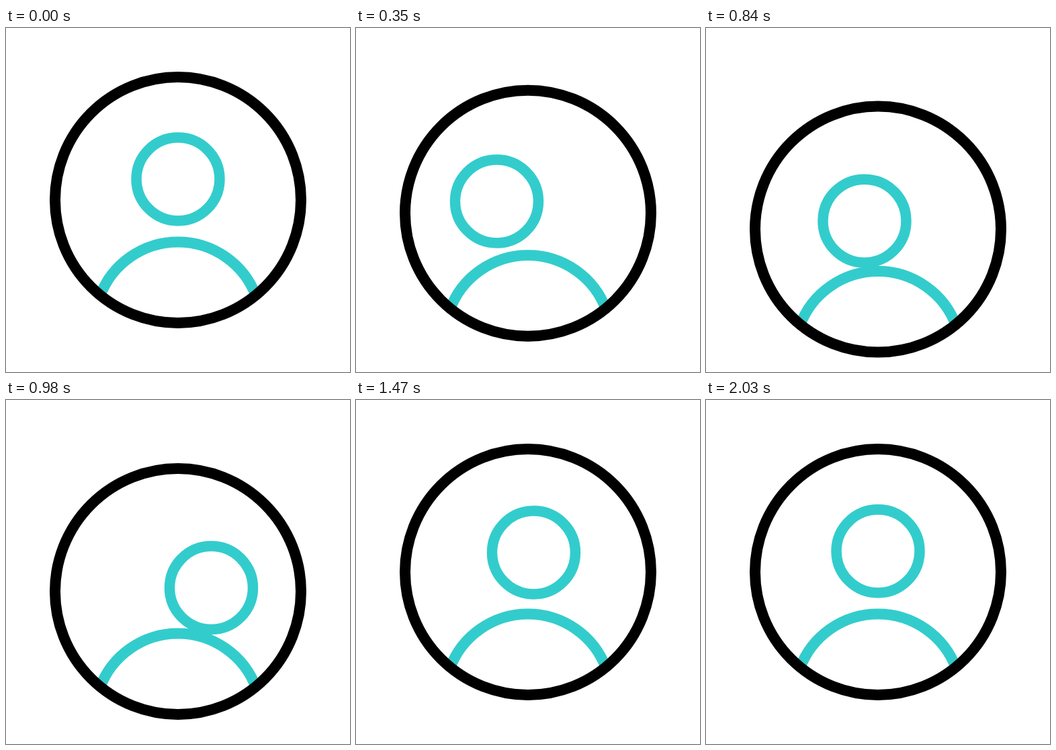
An HTML page for the animation above (2100 ms loop, 512 by 512 pixels).

```html
<!DOCTYPE html>
<html lang="en">
<head>
<meta charset="utf-8">
<title>Profile icon</title>
<style>
  html, body { margin: 0; width: 100%; height: 100%; overflow: hidden; background: #fff; }
  svg { display: block; width: 100vw; height: 100vh; }
</style>
</head>
<body>
<svg viewBox="0 0 512 512" fill="none" stroke="#33cccc" stroke-width="16">
  <g id="badge">
    <path d="M139.5 400A124 124 0 0 1 372.5 400"/>
    <circle cx="256" cy="256" r="183" stroke="#000"/>
  </g>
  <circle id="head" cx="256" cy="225" r="62" stroke-width="15.5"/>
</svg>
<script>
const STEP = 70, STEPS = 30;

// Smooth curve through [step, value] points, flat at turning points.
function curve(points) {
  const slope = i => (points[i + 1][1] - points[i][1]) / (points[i + 1][0] - points[i][0]);
  const tangents = points.map((_, i) => {
    if (i === 0 || i === points.length - 1) return 0;
    const a = slope(i - 1), b = slope(i);
    return a * b > 0 ? 2 * a * b / (a + b) : 0;
  });
  return t => {
    let i = 0;
    while (i < points.length - 2 && t > points[i + 1][0]) i++;
    const [t0, v0] = points[i], [t1, v1] = points[i + 1];
    const d = t1 - t0, u = (t - t0) / d, w = 1 - u;
    return v0 * w * w * (1 + 2 * u) + v1 * u * u * (3 - 2 * u)
      + d * u * w * (tangents[i] * w - tangents[i + 1] * u);
  };
}

const badgeY = curve([[0, 0], [5, 19.7], [8, 38.5], [9, 44], [10, 45], [11.4, 45],
  [14, 29], [16, 11.7], [17, 8.8], [20.8, 0], [STEPS, 0]]);
const headX = curve([[0, 0], [5, -46.5], [9, -79], [9.8, -80], [14, 49.5],
  [15.6, 68.5], [17, 68], [21, 8.5], [23, 0], [STEPS, 0]]);
const headY = curve([[0, 0], [5, 33], [9, 73], [9.8, 74.5], [12.4, 60],
  [14, 54.5], [17, 26], [21, 2], [23, 0], [STEPS, 0]]);

const badge = document.getElementById("badge");
const head = document.getElementById("head");

function draw() {
  const t = Math.floor(performance.now() / STEP + 0.05) % STEPS;
  badge.setAttribute("transform", `translate(0 ${badgeY(t)})`);
  head.setAttribute("transform", `translate(${headX(t)} ${headY(t)})`);
  requestAnimationFrame(draw);
}
draw();
</script>
</body>
</html>
```
